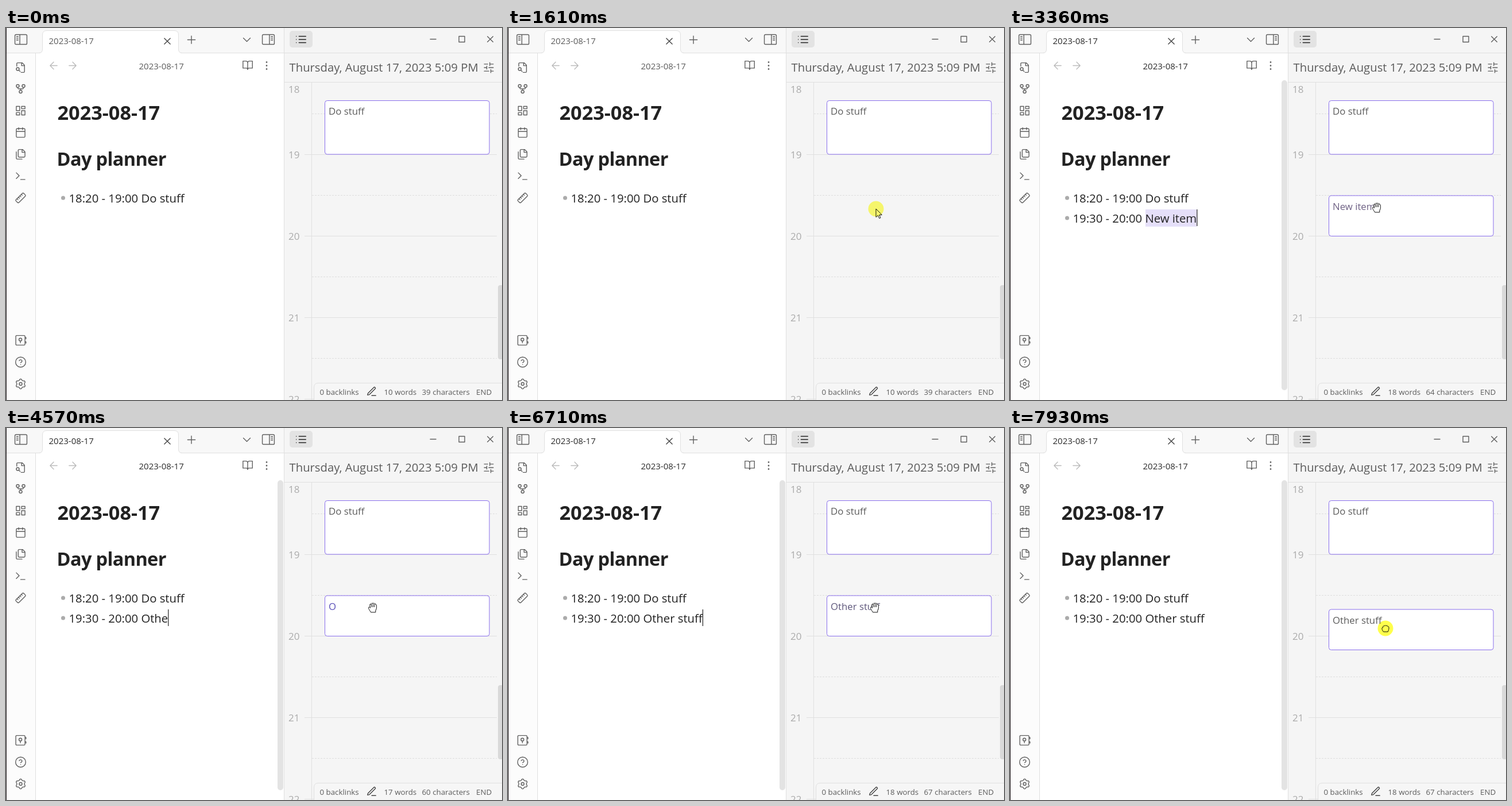
These frames come from a looping animation (864x648 px, 8 s). An HTML page:

```html
<!DOCTYPE html>
<html lang="en">
<head>
<meta charset="utf-8">
<title>Day planner</title>
<style>
  html, body { margin: 0; width: 100%; height: 100%; overflow: hidden; background: #fff; }
  svg { display: block; width: 864px; height: 648px; }
  text { font-family: "Open Sans", "Noto Sans", sans-serif; fill: #5c5c5c; white-space: pre; }
  .line { stroke: #e0e0e0; fill: none; }
  .dash { stroke: #dedede; stroke-dasharray: 3 2; }
  .icon { fill: none; stroke-linecap: round; stroke-linejoin: round; stroke-width: 1.4; }
  .icon path { vector-effect: non-scaling-stroke; }
  .small { font-size: 15px; }
  .title { font-weight: 700; fill: #222; }
  .note { font-size: 20.3px; fill: #222; }
  .head { font-size: 20.28px; }
  .task { font-size: 16.8px; }
  .hour { font-size: 17px; fill: #ababab; }
  .status { font-size: 13.3px; }
  .card { fill: #fff; stroke: #8a6fec; }
  .pointer { fill: #fff; stroke: #111; stroke-linejoin: round; }
  #press { fill: #ffff4c; mix-blend-mode: multiply; }
</style>
</head>
<body>
<svg viewBox="0 0 864 648">
  <!-- panels -->
  <rect width="864" height="648" fill="#fff"/>
  <rect width="485" height="44" fill="#f8f8f8"/>
  <rect y="44" width="51" height="604" fill="#fcfcfc"/>
  <rect x="485" width="379" height="648" fill="#f5f5f5"/>
  <rect width="1" height="648" fill="#2a2326"/>
  <path class="line" d="M1 43.5H485M51.5 44V648M484.5 0V648M485 43.5H864M485 94.5H864M532.5 95V648"/>
  <path d="M57 44Q63.5 43.5 63.5 37V12Q63.5 4.5 71 4.5H293Q300.5 4.5 300.5 12V37Q300.5 43.5 307 44z" fill="#fff"/>
  <path class="line" d="M57 43.5Q63.5 43.5 63.5 37V12Q63.5 4.5 71 4.5H293Q300.5 4.5 300.5 12V37Q300.5 43.5 307 43.5"/>
  <rect x="494" y="5" width="40" height="29" rx="5" fill="#e3e3e3"/>

  <!-- editor -->
  <text class="small focus" x="74.5" y="28">2023-08-17</text>
  <text class="small focus" x="231.5" y="72">2023-08-17</text>
  <text class="title" x="89.5" y="160" font-size="34.3">2023-08-17</text>
  <text class="title" x="88.5" y="240" font-size="32.5" letter-spacing="-.65">Day planner</text>
  <circle cx="99.5" cy="296" r="3.5" fill="#ababab"/>
  <text class="note" x="109.5" y="304">18:20 - 19:00 Do stuff</text>
  <g id="entry">
    <rect x="473" y="91" width="10" height="540" rx="5" fill="#e3e3e3"/>
    <rect id="selection" x="236" y="316" height="30" fill="#e5dff9"/>
    <circle cx="99.5" cy="331" r="3.5" fill="#ababab"/>
    <text id="typed" class="note" x="109.5" y="339"></text>
    <rect id="caret" y="316" width="1.2" height="29" fill="#222"/>
  </g>

  <!-- timeline -->
  <text class="head" x="493.5" y="76">Thursday, August 17, 2023 5:09 PM</text>
  <g id="hours"></g>
  <rect class="card" x="555.5" y="126.5" width="286.5" height="93.5" rx="4"/>
  <text class="task" x="562" y="151">Do stuff</text>
  <g id="item">
    <rect id="itemBox" class="card" x="555.5" y="292" width="286.5" height="70.5" rx="4"/>
    <text id="hint" class="task" x="562" y="317">Release outside timeline to cancel</text>
    <text id="itemText" class="task" x="562" y="317"></text>
  </g>
  <rect x="857" y="448" width="12" height="129" rx="4" fill="#d9d9d9"/>
  <path d="M536.5 649V626Q536.5 618.5 544 618.5H865V649z" fill="#f6f6f6" stroke="#e0e0e0"/>
  <text class="status" x="546.5" y="639">0 backlinks</text>
  <text class="status" x="658.5" y="639" id="words"></text>
  <text class="status" x="724.5" y="639" id="chars"></text>
  <text class="status" x="819" y="639">END</text>

  <g id="icons"></g>

  <!-- mouse -->
  <g id="mouse">
    <path id="arrow" class="pointer" d="M0 0V14.5L3.4 11.4L5.8 16.6L8 15.6L5.7 10.6H10.3z"/>
    <g id="hand" class="pointer">
      <path d="M-3.5 8C-5 5-8 2-7.5-.5C-7-2-5.5-1-4.5.5L-5.2-5C-5.2-6.8-3.2-7-2.8-5.2C-2.8-8.4 0-8.6.2-6.8C.6-8.6 3-8.4 3.1-6.2C4-7 6.2-6.4 6.3-4.2C6.8 0 6.5 2 4.8 5V8z"/>
      <path d="M-2.6-5.2L-2-1M.3-6.8V-1M3.1-6L2.8-1" fill="none"/>
    </g>
    <path id="fist" class="pointer" d="M-3.5 6C-5 3.5-6.5 2-6-.5C-5.5-1.8-4.8-1.5-4.3-1C-5-4-3-4.8-2-3.8C-1.5-5.6.5-5.6 1-4.2C2-5.4 3.8-4.8 4-3.2C5.6-3.8 6-2 6-1C6 2 5.5 3 4.2 6z"/>
    <circle id="press" r="13.5"/>
  </g>
</svg>
<script>
const $ = id => document.getElementById(id);
const clamp01 = v => Math.min(1, Math.max(0, v));

const ring = (x, y, r) => `M${x - r} ${y}a${r} ${r} 0 1 0 ${2 * r} 0a${r} ${r} 0 1 0 ${-2 * r} 0`;
const box = (x, y, w, h) =>
  `M${x + 2} ${y}h${w - 4}q2 0 2 2v${h - 4}q0 2-2 2h${4 - w}q-2 0-2-2v${4 - h}q0-2 2-2z`;
const gear = 'M' + Array.from({ length: 60 }, (_, i) => {
  const a = i * Math.PI / 30, r = 9 - 1.3 * Math.cos(6 * a);
  return [12 + r * Math.cos(a), 12 + r * Math.sin(a)].map(v => v.toFixed(2));
}).join('L') + 'z';
const cross = 'M6 6l12 12M18 6L6 18';

function icon(x, y, scale, d, color = '#5f5f5f') {
  $('icons').insertAdjacentHTML('beforeend',
    `<g class="icon" stroke="${color}" transform="translate(${x} ${y}) scale(${scale}) translate(-12 -12)"><path d="${d}"/></g>`);
}

const ribbon = [
  [69, 'M14 2v6h6M4 9V4a2 2 0 0 1 2-2h9l5 5v13a2 2 0 0 1-2 2h-5' + ring(6, 15, 3) + 'M8.2 17.2L11 20'],
  [106, ring(12, 18, 3) + ring(6, 6, 3) + ring(18, 6, 3) + 'M18 9v1a2 2 0 0 1-2 2H8a2 2 0 0 1-2-2V9M12 12v3'],
  [144, 'M3 3h7v9H3zM14 3h7v5h-7zM14 12h7v9h-7zM3 16h7v5H3z'],
  [182, box(3, 4, 18, 18) + 'M16 2v4M8 2v4M3 10h18'],
  [220, 'M9 2h7l5 5v9a2 2 0 0 1-2 2H9a2 2 0 0 1-2-2V4a2 2 0 0 1 2-2zM15 2v6h6M3 7v13a2 2 0 0 0 2 2h10'],
  [258, 'M3 17l6-6-6-6M12 19h9'],
  [296, 'M21.3 8.7L8.7 21.3c-1 1-2.5 1-3.4 0l-2.6-2.6c-1-1-1-2.5 0-3.4L15.3 2.7c1-1 2.5-1 3.4 0l2.6 2.6c1 1 1 2.5 0 3.4zM7.5 10.5l2 2M10.5 7.5l2 2M13.5 4.5l2 2M4.5 13.5l2 2'],
  [544, box(2, 2, 19, 20) + ring(11.5, 10.5, 3) + 'M11.5 13.5v4M21 6h2v3M21 15h2v3'],
  [582, ring(12, 12, 10.5) + 'M9.1 9a3 3 0 0 1 5.8 1c0 2-3 3-3 3M12 17h.01'],
  [620, gear + ring(12, 12, 3)],
];
ribbon.forEach(([y, d]) => icon(25.5, y, .84, d));

icon(26, 20, .95, box(1, 3, 22, 18) + 'M10 3v18M4 7h3M4 10h3M4 13h3');
icon(457, 20, .95, box(1, 3, 22, 18) + 'M14 3v18M17 7h3M17 10h3M17 13h3');
icon(281, 23, .85, cross, '#444');
icon(323, 20.5, .95, 'M12 5v14M5 12h14');
icon(419.5, 20.5, 1, 'M6 9l6 6 6-6');
icon(83, 65.5, .88, 'M19 12H5M12 19l-7-7 7-7', '#bcbcbc');
icon(116, 65.5, .88, 'M5 12h14M12 5l7 7-7 7', '#bcbcbc');
icon(421, 65, .82, 'M2 3h6a4 4 0 0 1 4 4v14a3 3 0 0 0-3-3H2zM22 3h-6a4 4 0 0 0-4 4v14a3 3 0 0 1 3-3h7z');
icon(454, 65.5, 1, [6, 12, 18].map(y => ring(12, y, .7)).join(''));
icon(514, 20, .92, 'M8 6h13M8 12h13M8 18h13M3 6h.01M3 12h.01M3 18h.01', '#222');
icon(744, 19.5, 1, 'M7 12h10');
icon(794, 19.5, 1, 'M7 7h10v10H7z');
icon(843.5, 19.5, .8, cross);
icon(841, 69, .88, 'M21 5h-7M10 5H3M21 12h-9M8 12H3M21 19h-5M12 19H3M14 2v6M8 9v6M16 16v6');
icon(637, 633, .8, 'M12 21h9M16.5 3.5a2.1 2.1 0 0 1 3 3L7 19l-4 1 1-4z', '#444');

const hourLabel = (hour, y) => `<text class="hour" x="492" y="${y}">${hour}</text>`;
let hours = hourLabel(18, 113) + '<path class="dash" d="M533 149.5H855"/>';
for (let i = 0; i < 4; i++) {
  const y = 220.5 + 142.1 * i;
  hours += hourLabel(19 + i, y + 6) +
    `<path class="line" d="M520 ${Math.floor(y) + .5}H855"/><path class="dash" d="M533 ${Math.floor(y + 71) + .5}H855"/>`;
}
$('hours').innerHTML = hours;

// Value of the last [time, value] step that has begun.
const stepAt = (t, steps) => steps.reduce((value, [time, next]) => t >= time ? next : value, steps[0][1]);

const keyTimes = [4160, 4230, 4430, 4570, 4700, 4830, 5030, 5300, 5370, 5510, 5580];
const caretSteps = [[0, 1], [2760, 0], [3360, 1], [3960, 0], [4160, 1], [6180, 0], [6710, 1], [7310, 0]];
const handSteps = [
  [0, [639, 313]], [6910, [642, 326]], [6980, [645, 338]], [7310, [648, 331]], [7380, [651, 323]],
  [7450, [652, 317]], [7730, [652, 316]], [7800, [653, 325]], [7860, [653, 337]], [7930, [654, 349]],
];
const show = (id, on) => { $(id).style.display = on ? '' : 'none'; };

function arrowAt(t) {
  const i = Math.floor(clamp01((t - 500) / 780) * 11 + .001) / 11;
  const u = i * i * (3 - 2 * i), v = 1 - u;
  const curve = (a, b, c) => v * v * a + 2 * v * u * b + u * u * c;
  return [curve(772, 618, 641), curve(618, 450, 315)];
}

function drawEditor(t) {
  const inserted = t >= 2160;
  const keys = keyTimes.filter(time => t >= time).length;
  const name = keys ? 'Other stuff'.slice(0, keys) : 'New item';
  document.querySelectorAll('.focus').forEach(el => el.style.fill = inserted ? '#2b2b2b' : '#5c5c5c');
  show('entry', inserted);
  if (inserted) {
    $('typed').textContent = '19:30 - 20:00 ' + name;
    const end = 109.5 + $('typed').getComputedTextLength();
    $('caret').setAttribute('x', end);
    $('caret').setAttribute('opacity', stepAt(t, caretSteps));
    $('selection').setAttribute('width', keys ? 0 : end - 236);
  }
  const words = t < 2230 ? 10 : keys && keys < 7 ? 17 : 18;
  $('words').textContent = words + ' words';
  $('chars').textContent = (inserted ? 56 + name.length : 39) + ' characters';
}

function drawItem(t, mouseY) {
  show('item', t >= 1680);
  const solid = stepAt(t, [[0, 0], [2160, .2], [2230, .6], [2350, 1]]);
  const ghost = stepAt(t, [[0, .2], [1740, .35], [1810, .5]]);
  const update = stepAt(t, [[0, 1], [6380, .4], [6450, .75], [6520, 1]]);
  const slot = t >= 7670 ? Math.floor((mouseY - 317) / 23.7) : 0;
  $('item').setAttribute('transform', `translate(0 ${Math.round(slot * 23.7)})`);
  $('itemBox').style.strokeOpacity = Math.max(solid, ghost + .1);
  $('itemBox').style.fillOpacity = Math.max(solid, ghost);
  $('hint').setAttribute('opacity', ghost * (1 - solid));
  $('itemText').setAttribute('opacity', solid * update);
  $('itemText').textContent = stepAt(t, [[0, 'New item'], [4300, 'O'], [6380, 'Other stuff']]);
  $('itemText').style.fill = stepAt(t, [[0, '#6f6285'], [4300, '#5a50b8'], [6380, '#5f587c'], [7800, '#5c5c5c']]);
}

function draw(t) {
  const creating = t < 1680;
  const [x, y] = creating ? arrowAt(t) : stepAt(t, handSteps);
  const dragging = t >= 7670;
  drawEditor(t);
  drawItem(t, y);
  show('mouse', t >= 500);
  $('mouse').setAttribute('transform', `translate(${x} ${y})`);
  show('arrow', creating);
  show('hand', !creating && !dragging);
  show('fist', dragging);
  show('press', dragging || (t >= 1610 && t < 2160));
  $('press').setAttribute('opacity', creating ? .8 : 1);
}

const start = performance.now();
(function loop() {
  draw((performance.now() - start) % 8000);
  requestAnimationFrame(loop);
})();
</script>
</body>
</html>
```
